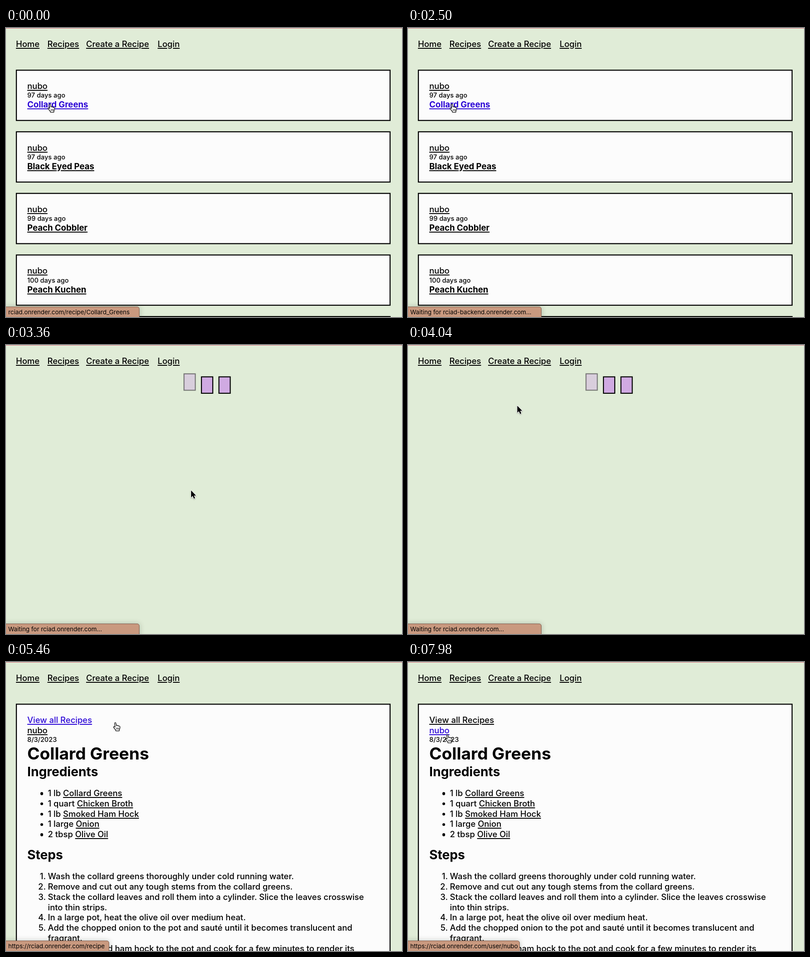
An HTML page with a canvas that plays this animation: 875x640 px, repeating every 8 s.

```html
<!DOCTYPE html>
<html lang="en">
<head>
<meta charset="utf-8">
<title>Recipes</title>
<style>
html, body { margin: 0; width: 100%; height: 100%; overflow: hidden; }
body { background: #e0ecd7; font-family: Inter, "Open Sans", sans-serif; color: #000; }
#stage { position: absolute; left: 0; top: 0; width: 875px; height: 640px; overflow: hidden;
  background: #e0ecd7; }
#stage::before { content: ""; position: absolute; left: 0; top: 0; width: 100%; height: 1px; background: #d9717f; }
.t { position: absolute; line-height: 0; height: 0; white-space: pre; font-size: 18.45px; font-weight: 500; }
.small { font-size: 14.5px; }
.bold { font-size: 18.6px; font-weight: 700; }
.h1 { font-size: 37.2px; font-weight: 700; }
.h2 { font-size: 28.2px; font-weight: 700; }
.status { font-size: 13.4px; font-weight: 400; }
u { text-decoration-thickness: 1.6px; text-underline-offset: 2px; }
.hot { color: #2b06d6; }
.card { position: absolute; left: 0; top: 0; }
#bar { position: absolute; left: -1px; top: 617px; height: 30px; box-sizing: border-box; overflow: hidden;
  background: #c9997f; border: 1px solid #7d5a4b; border-radius: 0 5px 0 0; box-shadow: 0 0 12px rgba(60, 70, 50, .3); }
canvas { position: absolute; left: 0; top: 0; }
</style>
</head>
<body>
<div id="stage">
  <div id="nav"></div>
  <div id="list"></div>
  <div id="recipe"></div>
  <div id="bar"></div>
  <canvas width="875" height="640"></canvas>
</div>
<script>
const LOOP = 8000, USER = 'nubo', HOST = 'rciad.onrender.com';
const SIZES = { '': 18.45, small: 14.5, bold: 18.6, h1: 37.2, h2: 28.2, status: 13.4 };
const $ = id => document.getElementById(id);
const link = s => `<u>${s}</u>`;

function add(parent, cls, style, html = '') {
  const el = document.createElement('div');
  el.className = cls;
  Object.assign(el.style, style);
  el.innerHTML = html;
  parent.append(el);
  return el;
}

// Places a line of text by its left edge and baseline.
function text(parent, x, base, html, kind = '') {
  const top = base - SIZES[kind] * 0.3635;
  return add(parent, 't ' + kind, { left: x + 'px', top: top + 'px' }, html);
}

// SVG keeps the fractional border crisp at its true width.
function card(parent, top, height) {
  const line = 2.3;
  add(parent, 'card', {}, `<svg width="875" height="640" style="display:block"><rect x="${21.8 + line / 2}"
    y="${top + line / 2}" width="${828 - line}" height="${height - line}" fill="#fcfcfc" stroke="#000"
    stroke-width="${line}"/></svg>`);
}

function buildNav() {
  [[22, 'Home'], [91.5, 'Recipes'], [177, 'Create a Recipe'], [335, 'Login']]
    .forEach(([x, s]) => text($('nav'), x, 42, link(s)));
}

function buildList() {
  const items = [['Collard Greens', 97], ['Black Eyed Peas', 97], ['Peach Cobbler', 99], ['Peach Kuchen', 100], ['', 0]];
  items.forEach(([title, days], i) => {
    const y = 136.4 * i, p = $('list');
    card(p, 92.3 + y, 113.6);
    if (!title) return;
    text(p, 47, 135 + y, link(USER));
    text(p, 47, 154.7 + y, days + ' days ago', 'small');
    text(p, 47, 176.2 + y, link(title), 'bold').classList.toggle('hot', i === 0);
  });
}

function buildRecipe() {
  const p = $('recipe'), row = 22.8;
  card(p, 92.3, 700);
  const all = text(p, 47, 135, link('View all Recipes'));
  const user = text(p, 47, 158, link(USER));
  text(p, 47, 177.2, '8/3/2023', 'small');
  text(p, 47, 217, 'Collard Greens', 'h1');
  text(p, 47, 253.3, 'Ingredients', 'h2');
  text(p, 47, 437.6, 'Steps', 'h2');

  [['1 lb', 'Collard Greens'], ['1 quart', 'Chicken Broth'], ['1 lb', 'Smoked Ham Hock'],
    ['1 large', 'Onion'], ['2 tbsp', 'Olive Oil']].forEach(([qty, name], i) => {
    const y = 296.8 + i * row;
    text(p, 92.5, y, qty + ' ' + link(name));
    add(p, '', { position: 'absolute', left: '76px', top: y - 8.6 + 'px', width: '6.4px', height: '6.4px',
      borderRadius: '50%', background: '#000' });
  });

  let y = 481, n = 0;
  [['Wash the collard greens thoroughly under cold running water.'],
    ['Remove and cut out any tough stems from the collard greens.'],
    ['Stack the collard leaves and roll them into a cylinder. Slice the leaves crosswise', 'into thin strips.'],
    ['In a large pot, heat the olive oil over medium heat.'],
    ['Add the chopped onion to the pot and sauté until it becomes translucent and', 'fragrant.'],
    ['Add the smoked ham hock to the pot and cook for a few minutes to render its']].forEach(lines => {
    const num = text(p, 0, y, ++n + '.');
    num.style.left = 'auto';
    num.style.right = 875 - 88 + 'px';
    lines.forEach(s => { text(p, 92.5, y, s); y += row; });
  });
  return { all, user };
}

const SHOW_LOADER = 3230, SHOW_RECIPE = 4500, HOVER_USER = 6950;
// Start time, bar width, message.
const STATUS = [
  [0, 295, HOST + '/recipe/Collard_Greens'],
  [600, 295, 'Waiting for rciad-backend.onrender.com...'],
  [3140, 13, ''],
  [3340, 295, `Waiting for ${HOST}...`],
  [5400, 228, `https://${HOST}/recipe`],
  [HOVER_USER, 247, `https://${HOST}/user/${USER}`]
];
// Start, end, from and to of each pointer move.
const MOVES = [
  [2500, 3100, 97, 168.5, 416, 330],
  [3280, 3950, 416, 330, 241.5, 134.5],
  [6780, 7320, 241.5, 134.5, 87, 161]
];

const ease = k => k * k * (3 - 2 * k);
const clamp = k => Math.max(0, Math.min(1, k));

function pointerAt(t) {
  const [, , x, y] = MOVES[0];
  return MOVES.reduce(([px, py], [a, b, x0, y0, x1, y1]) => {
    if (t < a) return [px, py];
    const k = ease(clamp((t - a) / (b - a)));
    return [x0 + (x1 - x0) * k, y0 + (y1 - y0) * k];
  }, [x, y]);
}

const ctx = document.querySelector('canvas').getContext('2d');
const ARROW = new Path2D('M0 0V15.6L3.6 12.2L6.2 18.2L8.8 17.1L6.3 11.3H11Z');
const HAND = new Path2D('M4 2.2C4 .4 7 .4 7 2.2L7.6 7.4C8 6 10.3 6.2 10.4 7.8C11 6.8 13 7.2 13.1 8.6' +
  'C14 8 16 8.6 15.9 10.2C15.9 14 15 15 14.2 16.6V19H6.6V17.2C5 15.6 3.6 13.4 2 11.6C.6 10 2.6 8.6 4 9.9L5 10.8Z');
const CREASES = new Path2D('M8.3 12V16M10.7 12V16M13 12V16');

function drawPointer(t) {
  const [x, y] = pointerAt(t);
  const arrow = t > MOVES[0][0] + 60 && t < SHOW_RECIPE;
  ctx.save();
  ctx.lineJoin = 'round';
  ctx.shadowColor = 'rgba(0,0,0,.35)';
  ctx.shadowBlur = 2;
  ctx.shadowOffsetY = 1;
  if (arrow) {
    ctx.translate(x, y);
    ctx.strokeStyle = '#fff';
    ctx.lineWidth = 2;
    ctx.stroke(ARROW);
    ctx.shadowColor = 'transparent';
    ctx.fillStyle = '#000';
    ctx.fill(ARROW);
  } else {
    ctx.translate(x - 5.5, y - 1);
    ctx.fillStyle = '#fff';
    ctx.fill(HAND);
    ctx.shadowColor = 'transparent';
    ctx.strokeStyle = '#000';
    ctx.lineWidth = 1.2;
    ctx.stroke(HAND);
    ctx.lineWidth = 1;
    ctx.stroke(CREASES);
  }
  ctx.restore();
}

// Three blocks hop and fade one after another.
function drawLoader(t) {
  const phase = (t - SHOW_LOADER) % 700 / 700 * 3;
  for (let i = 0; i < 3; i++) {
    const hop = Math.sin(Math.PI * clamp(phase - i));
    ctx.save();
    ctx.globalAlpha = 1 - 0.55 * hop;
    ctx.translate(393 + 38.6 * i, 70.2 - 6.8 * hop);
    ctx.fillStyle = '#d0aae2';
    ctx.fillRect(0, 0, 25.4, 36.6);
    ctx.strokeStyle = '#000';
    ctx.lineWidth = 2.2;
    ctx.strokeRect(0.3, 0.3, 25, 36.4);
    ctx.restore();
  }
}

buildNav();
buildList();
const links = buildRecipe();
const message = text($('bar'), 5, 16, '', 'status');

function frame() {
  const t = performance.now() % LOOP;
  $('list').hidden = t >= SHOW_LOADER;
  $('recipe').hidden = t < SHOW_RECIPE;
  links.all.classList.toggle('hot', t < HOVER_USER);
  links.user.classList.toggle('hot', t >= HOVER_USER);

  const [, width, label] = STATUS.filter(s => s[0] <= t).pop();
  $('bar').style.width = width + 1 + 'px';
  if (message.textContent !== label) message.textContent = label;

  ctx.clearRect(0, 0, 875, 640);
  if (t >= SHOW_LOADER && t < SHOW_RECIPE) drawLoader(t);
  drawPointer(t);
  requestAnimationFrame(frame);
}
frame();
</script>
</body>
</html>
```
